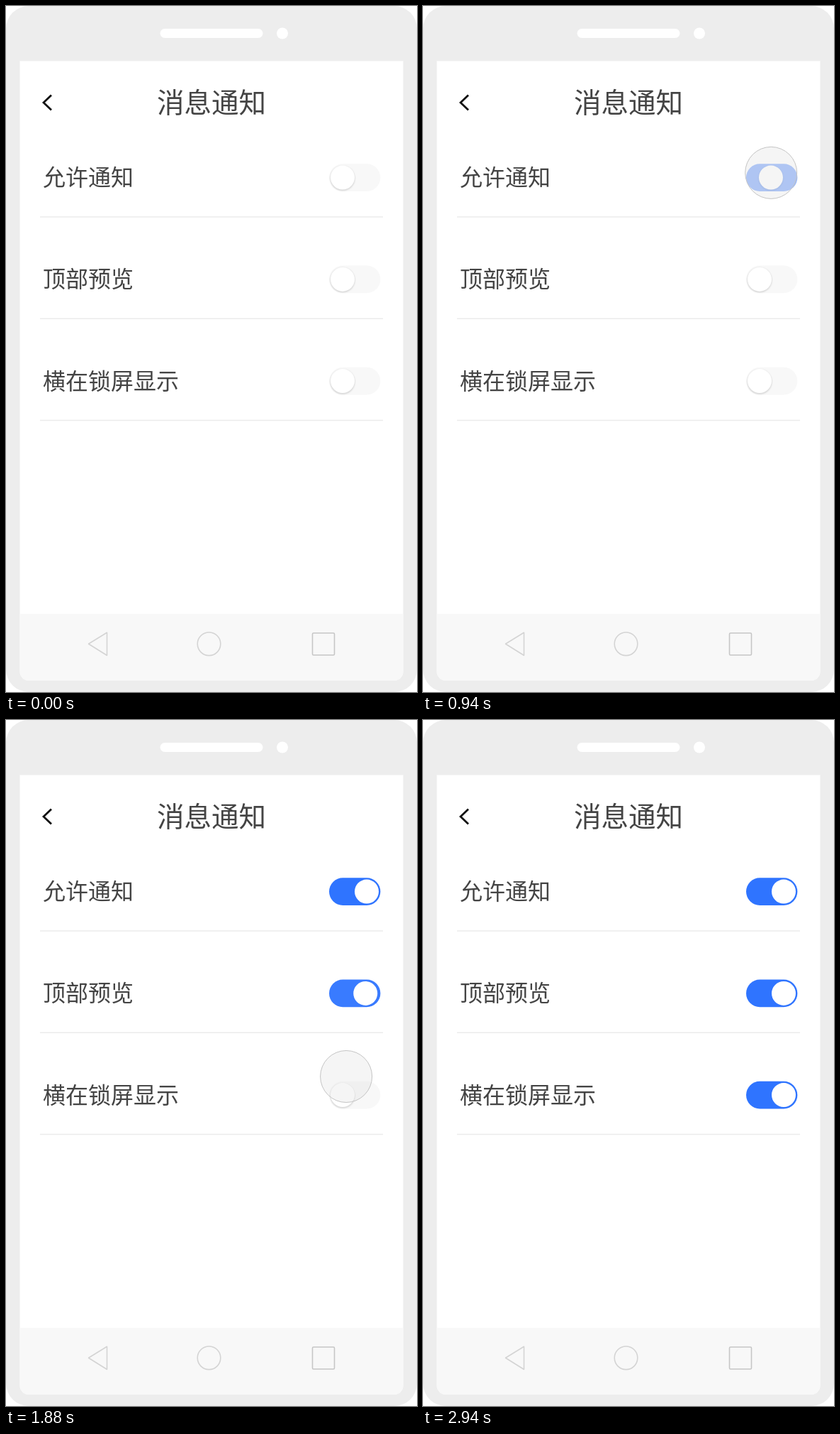
An HTML page that plays this animation: 580 px wide and 966 px high, repeating every 3.44 s.

```html
<!DOCTYPE html>
<html lang="zh-CN">
<head>
<meta charset="utf-8">
<title>消息通知</title>
<style>
html, body { margin: 0; width: 100%; height: 100%; overflow: hidden; background: #fff; }
svg { display: block; width: 580px; height: 966px; }
text { font-family: "Noto Sans CJK SC", "Noto Sans CJK JP", "Noto Sans CJK", sans-serif; fill: #444; }
.label { font-size: 32px; }
.title { font-size: 38.5px; text-anchor: middle; }
.rule { stroke: #ebebeb; stroke-width: 1.6; }
.nav { fill: none; stroke: #d4d4d4; stroke-width: 1.6; stroke-linejoin: round; }
</style>
</head>
<body>
<svg viewBox="0 0 580 966">
  <defs>
    <filter id="soft" x="-30%" y="-30%" width="160%" height="160%">
      <feGaussianBlur stdDeviation="1"/>
    </filter>
  </defs>
  <rect width="580" height="966" rx="32" fill="#ededed"/>
  <rect x="217.5" y="32" width="145" height="13" rx="6.5" fill="#fff"/>
  <circle cx="390" cy="38.5" r="8" fill="#fff"/>
  <path d="M19.5 77.5H560.5V937a13 13 0 0 1-13 13H32.5a13 13 0 0 1-13-13Z" fill="#fff"/>
  <path d="M19.5 856H560.5V937a13 13 0 0 1-13 13H32.5a13 13 0 0 1-13-13Z" fill="#f8f8f8"/>
  <path d="M64 125.5L53 136L64 146.5" fill="none" stroke="#111" stroke-width="2.8"/>
  <text class="title" x="290" y="150">消息通知</text>
  <g id="rows"></g>
  <path class="nav" d="M116.5 898.3L142.5 882.3V914.5Z"/>
  <circle class="nav" cx="286.5" cy="898.3" r="16.3"/>
  <rect class="nav" x="432.5" y="883" width="31" height="31" rx="1.5" style="stroke:#c6c6c6"/>
  <g id="touch">
    <circle id="fill"/>
    <circle id="ring" fill="none" stroke="#fff" stroke-opacity=".7" stroke-width="1.4"/>
    <circle id="edge" fill="none" stroke-width="1"/>
  </g>
</svg>
<script>
const LOOP = 3440;
const $ = id => document.getElementById(id);
const clamp = v => Math.min(1, Math.max(0, v));
const span = (t, from, to) => clamp((t - from) / (to - from));
const mix = (a, b, f) => a + (b - a) * f;
const set = (el, attrs) => { for (const k in attrs) el.setAttribute(k, attrs[k]); };

const easeOut = p => t => 1 - (1 - t) ** p;
const easeInOut = p => t => t < .5 ? (2 * t) ** p / 2 : 1 - (2 - 2 * t) ** p / 2;
const arc = (a, c, b, f) => (1 - f) ** 2 * a + 2 * f * (1 - f) * c + f * f * b;

// Each row: label, centre height, time the switch starts to slide
const rows = [
  ['允许通知', 241.6, 860],
  ['顶部预览', 384.9, 1620],
  ['横在锁屏显示', 528.1, 2400]
].map(([label, y, start]) => {
  const g = document.createElementNS('http://www.w3.org/2000/svg', 'g');
  g.setAttribute('transform', `translate(0 ${y})`);
  g.innerHTML = `
    <text class="label" x="52" y="11.4">${label}</text>
    <line class="rule" x1="48" x2="532" y1="55.4" y2="55.4"/>
    <rect x="456" y="-19.3" width="72.4" height="38.6" rx="19.3"/>
    <circle cy="1" r="17.4" fill="#000" filter="url(#soft)"/>
    <circle r="17" fill="#fff"/>`;
  $('rows').append(g);
  const [shadow, knob] = g.querySelectorAll('circle');
  return { start, track: g.querySelector('rect'), shadow, knob };
});

// Touch path: start and end time, points with the bend of x, easing
const moves = [
  { from: 80, to: 580, x: [516, 482, 490], y: [-40, 228.5], ease: easeInOut(2) },
  { from: 860, to: 1260, x: [490, 504, 501], y: [228.5, 375], ease: easeInOut(2.7) },
  { from: 1640, to: 2040, x: [501, 482, 479.5], y: [375, 514.7], ease: easeOut(2.6) },
  { from: 2050, to: 2180, x: [479.5, 481, 483], y: [514.7, 523.3], ease: easeOut(1.5) },
  { from: 2440, to: 2940, x: [483, 552, 556], y: [523.3, -40], ease: easeInOut(2), lead: .85 }
];
const presses = [[800, 860], [1520, 1640], [2340, 2420]];

function drawSwitch(row, t) {
  const f = easeOut(2.8)(span(t, row.start, row.start + 400));
  const x = mix(475, 509, f);
  const rgb = [[248, 47], [248, 116], [248, 255]].map(([a, b]) => Math.round(mix(a, b, f)));
  set(row.track, { fill: `rgb(${rgb})` });
  set(row.shadow, { cx: x, opacity: .15 * (1 - f) });
  set(row.knob, { cx: x });
}

function drawTouch(t) {
  const m = moves.filter(m => t >= m.from).pop();
  const shown = m && t < 2940;
  $('touch').style.display = shown ? '' : 'none';
  if (!shown) return;

  const f = m.ease(span(t, m.from, m.to));
  const x = arc(...m.x, f ** (m.lead || 1));
  const y = mix(...m.y, f);
  const p = Math.max(...presses.map(([a, b]) => t < a ? 0 : 1 - span(t, b, b + 40)));
  const r = mix(36.5, 35, p);
  set($('touch'), { transform: `translate(${x} ${y})` });
  const grey = Math.round(mix(220, 200, p));
  set($('fill'), { r, fill: `rgba(${grey},${grey},${grey},${mix(.3, .45, p)})` });
  set($('ring'), { r: r - 1.2, opacity: p });
  const line = Math.round(mix(196, 168, p));
  set($('edge'), { r, stroke: `rgb(${line},${line},${line})` });
}

const begin = performance.now();
function draw() {
  const t = (performance.now() - begin) % LOOP;
  rows.forEach(row => drawSwitch(row, t));
  drawTouch(t);
  requestAnimationFrame(draw);
}
draw();
</script>
</body>
</html>
```
